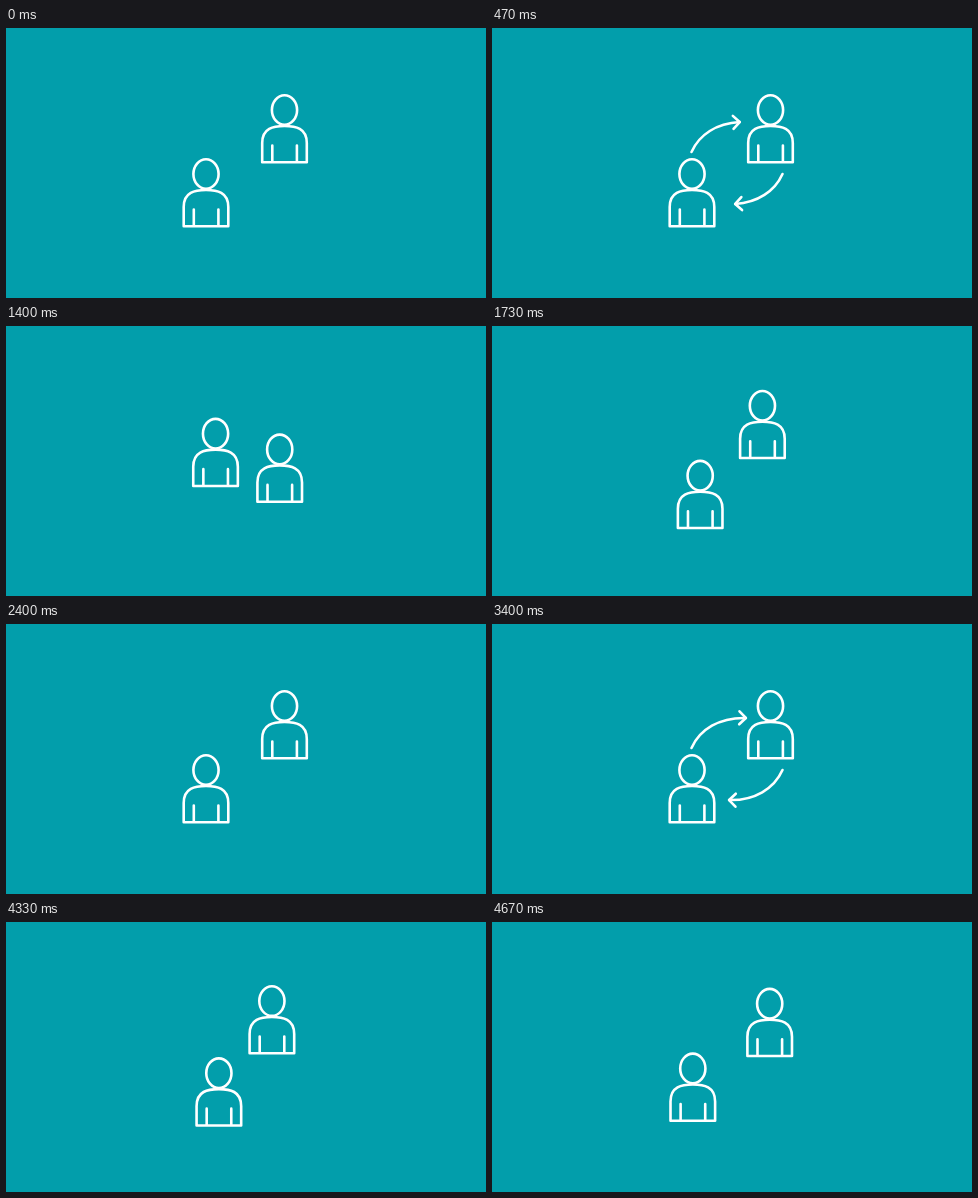
These frames come from a looping animation (480 by 270 pixels, 4.74 s). An HTML page:

```html
<!DOCTYPE html>
<html lang="en">
<head>
<meta charset="utf-8">
<title>Two people trading places</title>
<style>
  html, body { margin: 0; width: 100%; height: 100%; overflow: hidden; background: #029eab; }
  svg { display: block; width: 100%; height: 100%; }
  .lines { fill: none; stroke: #fff; stroke-width: 2.6; stroke-linecap: round; stroke-linejoin: round; }

  .person, .head, .shaft, .arrows { animation: 2.6666s infinite both; }

  .person { offset-rotate: 0deg; offset-anchor: 0 0; animation-name: travel; }
  .rising { offset-path: path("M200 146C200 94 242 69 278.5 82"); }
  .falling { offset-path: path("M278.5 82C291 132 239 168 200 146"); }

  .arrows { animation-name: show; animation-timing-function: step-end; }
  .shaft { stroke-dasharray: 1 2; animation-name: draw; }
  .head { offset-rotate: auto; offset-anchor: 0 0; animation-name: draw; }
  .upper { offset-path: path("M199.5 124C208 105 228 93 255 94"); }
  .lower { offset-path: path("M290.5 146C282 165 262 177 236 176"); }

  @keyframes travel {
    0% { offset-distance: 0%; }
    45% { offset-distance: 0%; animation-timing-function: cubic-bezier(.36, 0, .47, .9); }
    65% { offset-distance: 93%; animation-timing-function: cubic-bezier(.3, .6, .6, 1); }
    80%, 100% { offset-distance: 100%; }
  }
  @keyframes draw {
    0% { offset-distance: 0%; stroke-dashoffset: 1; animation-timing-function: cubic-bezier(.36, 0, .47, .9); }
    20% { offset-distance: 93%; stroke-dashoffset: .07; animation-timing-function: cubic-bezier(.3, .6, .6, 1); }
    35%, 100% { offset-distance: 100%; stroke-dashoffset: 0; }
  }
  @keyframes show {
    0% { visibility: hidden; }
    1% { visibility: visible; }
    47%, 100% { visibility: hidden; }
  }
</style>
</head>
<body>
<svg viewBox="0 0 480 270">
  <defs>
    <g id="person">
      <ellipse rx="12.6" ry="14.8"/>
      <path d="M-22.3 52.3V33C-22.3 18 -11 16 0 16S22.3 18 22.3 33V52.3ZM-12.2 35.5V52M12.4 35.5V52"/>
    </g>
    <path id="head" d="M-6.5 -6.5L0 0L-6.5 6.5"/>
  </defs>
  <g class="lines">
    <g class="arrows">
      <path class="shaft" pathLength="1" d="M199.5 124C208 105 228 93 255 94"/>
      <path class="shaft" pathLength="1" d="M290.5 146C282 165 262 177 236 176"/>
      <g class="head upper"><use href="#head"/></g>
      <g class="head lower"><use href="#head"/></g>
    </g>
    <g class="person rising"><use href="#person"/></g>
    <g class="person falling"><use href="#person"/></g>
  </g>
</svg>
<script>
  // Drives the CSS animations on a 15 fps clock that restarts mid-swap.
  const LOOP = 4740, STEP = 200 / 3, LAST = 70;
  const animations = document.getAnimations();
  const start = performance.now();
  animations.forEach(a => a.pause());

  function tick() {
    const time = (performance.now() - start) % LOOP;
    const step = Math.min(LAST, Math.floor((time + 4) / STEP));
    animations.forEach(a => { a.currentTime = step * STEP; });
    requestAnimationFrame(tick);
  }
  tick();
</script>
</body>
</html>
```
